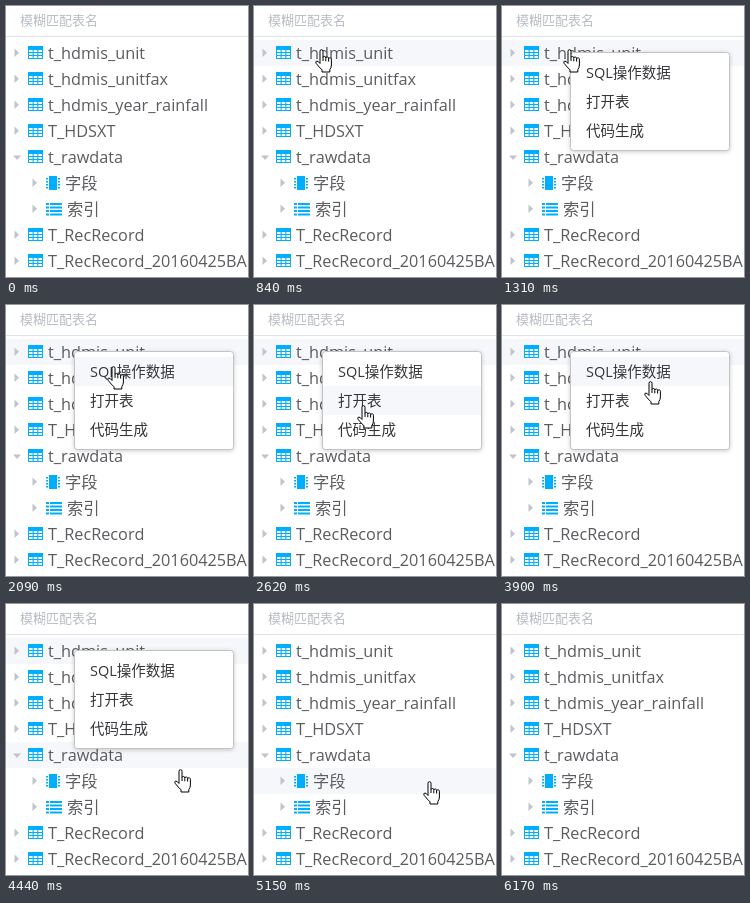
An HTML page for the animation above (6.26 s loop, 242 by 271 pixels).

```html
<!DOCTYPE html>
<html lang="zh-CN">
<meta charset="utf-8">
<style>
  html, body { margin: 0; width: 100%; height: 100%; overflow: hidden; background: #fff; }
  svg { display: block; }
  text { font: 16.25px "Open Sans", "Noto Sans CJK SC", "Noto Sans CJK", sans-serif; font-kerning: none; fill: #5a5c60; }
  .hint { font-size: 13px; fill: #b8bcc4; }
  #menu text { font-size: 14.5px; fill: #36373a; }
  .hover { fill: #f5f7fa; }
  .arrow { fill: #c0c4cc; }
  .icon { fill: #00aeff; fill-rule: evenodd; }
  #menu .box { fill: #fff; stroke: #c4c4c4; filter: drop-shadow(0 1px 2px #0003); }
</style>
<body>
<svg width="242" height="271">
  <text class="hint" x="14" y="19">模糊匹配表名</text>
  <path d="M0 30.5H242" stroke="#dfe2e8"/>
  <g id="tree"></g>
  <g id="menu"><rect class="box" x="68.5" y="46.5" width="159" height="98" rx="3"/></g>
  <circle id="click" r="12" fill="#ff0" fill-opacity=".47"/>
  <g id="cursor" fill="#fff" stroke="#000" stroke-linejoin="round">
    <path transform="translate(-6 0)" d="M5 14.5V2.2a1.5 1.5 0 0 1 3 0V8.6a1.4 1.4 0 0 1 2.8.5a1.4 1.4 0 0 1 2.8.7
      a1.4 1.4 0 0 1 2.8 1V16q0 2.5-1.6 4.6V23H7V20.8Q4.5 18.6 1.1 14.3q-.8-1.5.3-2.2q1.6-.6 3.6 2.4Z
      M8 8.6V12M10.8 9.3V12.3M13.6 10V12.6"/>
  </g>
</svg>
<script>
const LOOP = 6260, TICK = 78, ROW = 26, TOP = 34, ITEM = 29, MENU_TOP = 52;
const $ = id => document.getElementById(id);
const box = (x, y, w, h) => `M${x} ${y}h${w}v${h}h${-w}z`;
const repeat = (n, part) => Array.from({ length: n }, (_, i) => part(i)).join('');

const table = { width: 15, path: box(0, 0, 15, 13) +
  repeat(9, i => box(1 + i % 3 * 4.7, 4 + Math.floor(i / 3) * 3, 3.6, 2)) };
const chip = { width: 14, path: box(3, 0, 8, 14) +
  repeat(4, i => box(0, 2 + i * 3, 2, 1.5) + box(12, 2 + i * 3, 2, 1.5)) };
const list = { width: 16, path: repeat(4, i => box(0, 1 + i * 3.5, 3, 2) + box(4, 1 + i * 3.5, 12, 2)) };

const rows = ['t_hdmis_unit', 't_hdmis_unitfax', 't_hdmis_year_rainfall', 'T_HDSXT', 't_rawdata',
              '字段', '索引', 'T_RecRecord', 'T_RecRecord_20160425BA'];
const items = ['SQL操作数据', '打开表', '代码生成'];
const childIcons = { 字段: chip, 索引: list };

$('tree').innerHTML = rows.map((label, i) => {
  const icon = childIcons[label] || table, indent = icon === table ? 0 : 18;
  const arrow = label === 't_rawdata' ? 'M7 11.5h8l-4 4.5z' : `M${8.5 + indent} 8.5v8.5l4.5-4.2z`;
  return `<g transform="translate(0 ${TOP + i * ROW})">
    <rect class="hover" width="242" height="${ROW}"/><path class="arrow" d="${arrow}"/>
    <path class="icon" transform="translate(${22 + indent} 6)" d="${icon.path}"/>
    <text x="${27 + indent + icon.width}" y="19">${label}</text></g>`;
}).join('');
$('menu').innerHTML += items.map((label, i) =>
  `<g transform="translate(69 ${MENU_TOP + i * ITEM})">
    <rect class="hover" width="158" height="${ITEM}"/><text x="15" y="20">${label}</text></g>`).join('');
const rowMarks = document.querySelectorAll('#tree .hover');
const itemMarks = document.querySelectorAll('#menu .hover');

// The pointer glides from each stop to the next, slowing down as it arrives.
const stops = [
  { x: 172, y: 268 },
  { x: 67, y: 43, start: 300, end: 840 },
  { x: 111, y: 63, start: 1790, end: 2250 },
  { x: 109, y: 102, start: 2400, end: 2720 },
  { x: 107, y: 136, start: 2950, end: 3340 },
  { x: 137, y: 70, start: 3570, end: 3850 },
  { x: 171, y: 88, start: 3850, end: 4130 },
  { x: 175, y: 177, start: 4200, end: 4600 },
  { x: 226, y: 269, start: 5470, end: 5690 },
];

function pointer(t) {
  const i = stops.findLastIndex(s => t >= s.start);
  if (i < 0 || t >= stops.at(-1).end) return null;
  const from = stops[i - 1], to = stops[i];
  const steps = Math.round((to.end - to.start) / TICK) + 1;
  const step = Math.floor((t - to.start) / TICK + .25) + 1;
  const ease = Math.sin(Math.min(1, step / steps) * Math.PI / 2);
  return [from.x + (to.x - from.x) * ease, from.y + (to.y - from.y) * ease].map(Math.round);
}

const show = (el, on) => el.style.display = on ? '' : 'none';
const within = (t, start, end) => t >= start && t < end;

function draw() {
  const t = performance.now() % LOOP;
  const p = pointer(t), [x, y] = p || [0, 0];
  const open = within(t, 1310, 5150);
  const inMenu = open && within(x, 68, 228) && within(y, 46, 145);
  const row = p && !inMenu ? Math.floor((y - 2 - TOP) / ROW) : -1;
  const item = inMenu ? Math.floor((y - MENU_TOP) / ITEM) : -1;
  const focus = within(t, 1160, 5000) ? 0 : within(t, 5000, 6170) ? 5 : -1;

  rowMarks.forEach((el, i) => show(el, i === row || i === focus));
  itemMarks.forEach((el, i) => show(el, i === item));
  show($('menu'), open);
  show($('click'), within(t, 1160, 1310) || within(t, 5000, 5150));
  show($('cursor'), p);
  for (const id of ['click', 'cursor']) $(id).setAttribute('transform', `translate(${x} ${y})`);
  requestAnimationFrame(draw);
}
draw();
</script>
</body>
</html>
```
